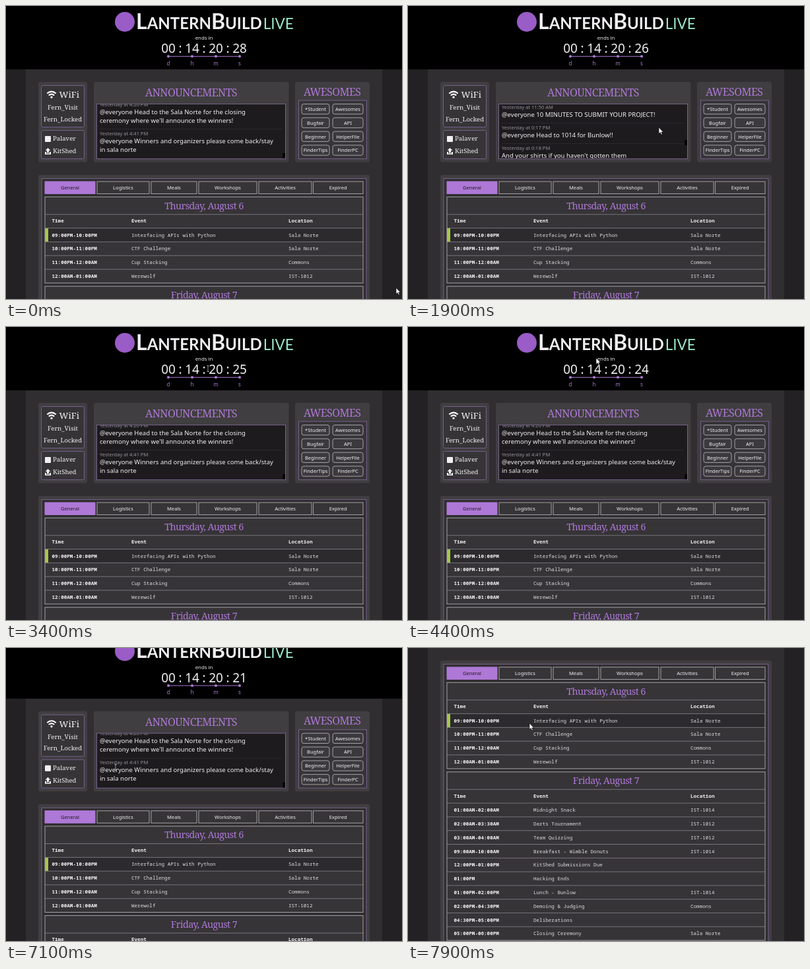
An HTML page for the animation above (8000 ms loop, 600 by 444 pixels).

```html
<!DOCTYPE html>
<html lang="en">
<head>
<meta charset="utf-8">
<title>Event dashboard</title>
<style>
html, body { margin: 0; width: 100%; height: 100%; overflow: hidden; background: #232123; }
svg { display: block; width: 600px; height: 444px; }
text { font-family: "Noto Sans", sans-serif; fill: #f2f0f3; white-space: pre; }
.serif { font-family: "Noto Serif", serif; }
.head { font-family: "Noto Serif", serif; font-weight: 500; fill: #ae78d6; letter-spacing: -.6px; }
.mono { font-family: "Noto Sans Mono", monospace; fill: #dedce0; }
.bold { font-weight: bold; fill: #f2f0f3; }
.logo { font-family: Lato, sans-serif; font-weight: bold; }
.live { font-weight: normal; fill: #9be8cb; }
.date { fill: #96939a; font-weight: 500; }
.purple { fill: #ae78d6; }
.mid { text-anchor: middle; }
</style>
</head>
<body>
<svg id="stage" viewBox="0 0 600 444"></svg>
<script>
const PURPLE = '#ae78d6', EDGE = '#75608a', LINE = '#a3a1a5';
const CARD = '#403e40', COLUMN = '#302e30', PANEL = '#363437';
const BUTTONS = ['*Student', 'Awesomes', 'Bugfair', 'API', 'Beginner', 'HelperFile', 'FinderTips', 'FinderPC'];
const TABS = [['General', 59, 135], ['Logistics', 138, 217], ['Meals', 220, 289],
  ['Workshops', 292, 380], ['Activities', 383, 463], ['Expired', 465.5, 541]];
const THURSDAY = [
  ['09:00PM-10:00PM', 'Interfacing APIs with Python', 'Sala Norte'],
  ['10:00PM-11:00PM', 'CTF Challenge', 'Sala Norte'],
  ['11:00PM-12:00AM', 'Cup Stacking', 'Commons'],
  ['12:00AM-01:00AM', 'Werewolf', 'IST-1012']];
const FRIDAY = [
  ['01:00AM-02:00AM', 'Midnight Snack', 'IST-1014'],
  ['02:00AM-03:30AM', 'Darts Tournament', 'IST-1012'],
  ['03:00AM-04:00AM', 'Team Quizzing', 'IST-1012'],
  ['09:00AM-10:00AM', 'Breakfast - Wimble Donuts', 'IST-1014'],
  ['12:00PM-01:00PM', 'KitShed Submissions Due', ''],
  ['01:00PM', 'Hacking Ends', ''],
  ['01:00PM-02:00PM', 'Lunch - Bunlow', 'IST-1014'],
  ['02:00PM-04:30PM', 'Demoing &amp; Judging', 'Commons'],
  ['04:30PM-05:00PM', 'Deliberations', ''],
  ['05:00PM-06:00PM', 'Closing Ceremony', 'Sala Norte']];
// Newest first
const POSTS = [
  ['4:41 PM', '@everyone Winners and organizers please come back/stay', 'in sala norte'],
  ['4:20 PM', '@everyone Head to the Sala Norte for the closing', "ceremony where we'll announce the winners!"],
  ['3:52 PM', 'Demos are done, thank you everyone'],
  ['2:10 PM', '@everyone Judges are walking around now!'],
  ['1:05 PM', 'Demos start at 2, get your tables ready'],
  ['0:18 PM', "And your shirts if you haven't gotten them"],
  ['0:17 PM', '@everyone Head to 1014 for Bunlow!!'],
  ['11:50 AM', '@everyone 10 MINUTES TO SUBMIT YOUR PROJECT!'],
  ['11:30 AM', '@everyone Half an hour left!']];

const text = (x, y, size, str, cls = '', extra = '') =>
  `<text x="${x}" y="${y}" font-size="${size}" class="${cls}" ${extra}>${str}</text>`;
const rect = (x, y, w, h, fill, stroke = 'none', r = 0, extra = '') =>
  `<rect x="${x}" y="${y}" width="${w}" height="${h}" rx="${r}" fill="${fill}" stroke="${stroke}" ${extra}/>`;
const rule = (x1, x2, y, color) => `<path d="M${x1} ${y}H${x2}" stroke="${color}" fill="none"/>`;
const heading = (x, y, size, str) => text(x, y, size, str, 'head mid');

function header() {
  let s = rect(0, 0, 600, 96, '#000') + '<circle cx="180" cy="24" r="15" fill="#9a5cc6"/>' +
    text(197, 34.5, 24, '<tspan font-size="32">L</tspan>ANTERN<tspan font-size="32">B</tspan>UILD' +
      '<tspan dx="2" font-size="22.5" class="live">LIVE</tspan>', 'logo') +
    text(300, 51, 7.8, 'ends in', 'mid') + rule(246, 354, 76.3, PURPLE);
  ['00', '14', '20', '28'].forEach((part, i) => {
    const x = 246 + 36 * i;
    s += text(x, 71, 19, part, 'mid', i === 3 ? 'id="seconds"' : '') +
      `<circle cx="${x}" cy="76.3" r="2" fill="${PURPLE}"/>` + text(x, 89.5, 8, 'dhms'[i], 'mid purple');
    if (i < 3) s += text(x + 18, 71, 19, ':', 'mid');
  });
  return s;
}

function network() {
  return rect(49, 115, 74, 121.5, CARD, 'none', 3) +
    rect(53.5, 120.5, 65, 63, PANEL, EDGE, 2) + rect(53.5, 188.5, 65, 43, PANEL, EDGE, 2) +
    '<g fill="none" stroke="#fff" stroke-width="2"><path d="M62.3 132.6q6.7-6 13.4 0M64.8 135.4q4.2-3.6 8.4 0"/></g>' +
    '<circle cx="69" cy="138.2" r="1.6" fill="#fff"/>' +
    text(80.5, 139.3, 13.4, 'WiFi', 'serif') +
    text(86, 157, 9.6, 'Fern_Visit', 'serif mid') + text(86, 174.5, 9.6, 'Fern_Locked', 'serif mid') +
    rect(59, 197, 9, 9, '#f2f0f3', 'none', 1) + text(71, 204.3, 9.6, 'Palaver', 'serif') +
    '<path d="M63.5 215l4 4h-2.5v3.5h-3V219h-2.5zM59 221h2v2.5h5V221h2v4h-9z" fill="#f2f0f3"/>' +
    text(71, 223, 9.6, 'KitShed', 'serif');
}

function announcements() {
  let y = 237, list = '';
  for (const [time, ...lines] of POSTS) {
    y -= 18 + 13 * lines.length;
    list += rule(142, 418, y - 6.5, '#2c292e') + text(142, y + 2.6, 7.5, 'Yesterday at ' + time, 'date');
    lines.forEach((line, i) => list += text(142, y + 14.6 + 13 * i, 9.55, line));
  }
  return rect(133, 115, 295.5, 121.5, CARD, 'none', 3) + heading(280.5, 137.3, 16, 'ANNOUNCEMENTS') +
    rect(137.5, 148.5, 286, 83, '#1d1b1e', EDGE) +
    `<clipPath id="box">${rect(138, 149, 285, 82, '#000')}</clipPath>` +
    `<g clip-path="url(#box)"><g id="posts">${list}</g></g>` +
    rect(419.5, 223, 3.5, 8, '#000', 'none', 0, 'id="thumb"');
}

const buttonBox = i => ({ x: i % 2 ? 495 : 448, y: 148.5 + 20.8 * (i >> 1), w: i % 2 ? 46 : 42, h: 15.3 });

function awesomes() {
  return rect(438, 115, 113, 121.5, CARD, 'none', 3) + heading(494.2, 135.5, 16, 'AWESOMES') +
    rect(443.5, 143, 103, 88.5, PANEL, EDGE) +
    BUTTONS.map((name, i) => {
      const b = buttonBox(i);
      return `<g class="button">${rect(b.x, b.y, b.w, b.h, '#3c393e', LINE, 3)}` +
        text(b.x + b.w / 2, b.y + 10.4, 7.5, name, 'mid') + '</g>';
    }).join('');
}

function day(top, title, rows) {
  const pitch = 20.8, first = top + 47.3, height = 47.3 + pitch * rows.length;
  let s = rect(59, top, 482, height, PANEL) + heading(300, top + 18.2, 14.4, title) +
    rule(59, 541, top + 26.5, '#77747a');
  ['Time', 'Event', 'Location'].forEach((name, i) =>
    s += text([69.5, 190, 428][i], top + 39, 7.6, name, 'mono bold'));
  rows.forEach((row, r) => {
    const y = first + pitch * r;
    if (rows === THURSDAY && !r) s += rect(59, y, 482, pitch, '#2c2a2d') + rect(59, y, 5, pitch, '#a6c64d');
    s += rule(59, 541, y, '#77747a');
    row.forEach((cell, i) =>
      s += text([69.5, 190, 428][i], y + 13, 7.6, cell, i ? 'mono' : 'mono bold'));
  });
  return s + rect(59, top, 482, height, 'none', LINE);
}

function schedule() {
  return rect(49, 256, 502, 460, CARD, 'none', 3) + rect(54, 261.5, 492, 449, COLUMN, EDGE) +
    TABS.map(([name, a, b], i) => rect(a, 266, b - a, 18.5, i ? PANEL : PURPLE, i ? LINE : PURPLE) +
      text((a + b) / 2, 278, 7.6, name, 'mid', i ? '' : 'style="fill:#1d1b1e"')).join('') +
    day(289.3, 'Thursday, August 6', THURSDAY) + day(424.8, 'Friday, August 7', FRIDAY);
}

const CURSORS = {
  arrow: '<path d="M0 0V9.5L2.2 7.5 3.7 11 5.3 10.3 3.8 7H6.8Z" fill="#fff" stroke="#111" stroke-width=".7"/>',
  beam: '<path d="M-1.5-4.5H1.5M0-4.5V4.5M-1.5 4.5H1.5" stroke="#aaa" stroke-width=".9" fill="none"/>',
  hand: '<path d="M0 0Q1-1 2 0V4L6 5Q7 5.5 6.7 7L6 10H1L-2 6.5Q-2-.5 0 6.5Z" fill="#fff" stroke="#111" stroke-width=".7"/>'
};

const stage = document.getElementById('stage');
stage.innerHTML = rect(0, 0, 600, 444, '#232123') +
  `<g id="page">${rect(30, 96, 540, 700, COLUMN)}${header()}${network()}${announcements()}${awesomes()}${schedule()}</g>` +
  '<g id="cursor"></g>';
const [page, posts, thumb, seconds, cursor] =
  ['page', 'posts', 'thumb', 'seconds', 'cursor'].map(id => document.getElementById(id));
const buttons = [...document.querySelectorAll('.button')];

// Keys are [time, ...values]
const POINTER = [[0, 591, 427], [100, 591, 427], [500, 520, 330], [1000, 425, 215], [1300, 380, 184],
  [2700, 380, 184], [3200, 320, 76], [3400, 306, 63], [3600, 430, 24], [3800, 425, 24], [4200, 270, 30],
  [4400, 285, 47], [4700, 300, 50], [5200, 518, 157], [5400, 516, 177], [5550, 468, 198],
  [5680, 470, 218], [5780, 518, 219], [5900, 518, 204], [6000, 516, 200], [6300, 330, 425],
  [6900, 170, 190], [7100, 166, 181], [7900, 184, 114]];
const SCROLL = [[7000, 0], [7100, 19.3], [7900, 237]];
const POSTS_SCROLL = [[1200, 0], [1700, 190], [2000, 190], [2600, 0]];

function at(keys, t) {
  const n = keys.findIndex(k => k[0] > t);
  if (n < 1) return keys[n ? keys.length - 1 : 0].slice(1);
  const a = keys[n - 1], b = keys[n], f = (t - a[0]) / (b[0] - a[0]);
  return a.slice(1).map((v, i) => v + (b[i + 1] - v) * f);
}

const blend = (a, b, f) => `rgb(${a.map((v, i) => Math.round(v + (b[i] - v) * f))})`;

function over(i, t) {
  const [x, y] = at(POINTER, t), b = buttonBox(i);
  return x > b.x && x < b.x + b.w && y > b.y && y < b.y + b.h;
}

function draw(now) {
  const t = Math.floor(now % 8000 / 100) * 100;
  const [scroll] = at(SCROLL, t), [lift] = at(POSTS_SCROLL, t), [x, y] = at(POINTER, t);
  page.setAttribute('transform', `translate(0 ${-scroll})`);
  posts.setAttribute('transform', `translate(0 ${lift})`);
  thumb.setAttribute('y', 223 - lift * 20 / 190);
  seconds.textContent = 28 - Math.floor((t + 300) / 1000);

  // Each button fades over 300 ms as the pointer enters and leaves
  buttons.forEach((el, i) => {
    let f = 0;
    for (let lag = 0; lag < 300; lag += 25) f += over(i, t - lag) / 12;
    el.firstChild.style.fill = blend([60, 57, 62], [174, 120, 214], f);
    el.lastChild.style.fill = blend([242, 240, 243], [29, 27, 30], f);
  });

  const onText = t >= 3200 && t < 3500 || t >= 6900 && t < 7300;
  const kind = BUTTONS.some((_, i) => over(i, t)) ? 'hand' : onText ? 'beam' : 'arrow';
  if (cursor.dataset.kind !== kind) {
    cursor.dataset.kind = kind;
    cursor.innerHTML = CURSORS[kind];
  }
  cursor.setAttribute('transform', `translate(${x} ${y})`);
}

function tick() {
  draw(performance.now());
  requestAnimationFrame(tick);
}
tick();
</script>
</body>
</html>
```
